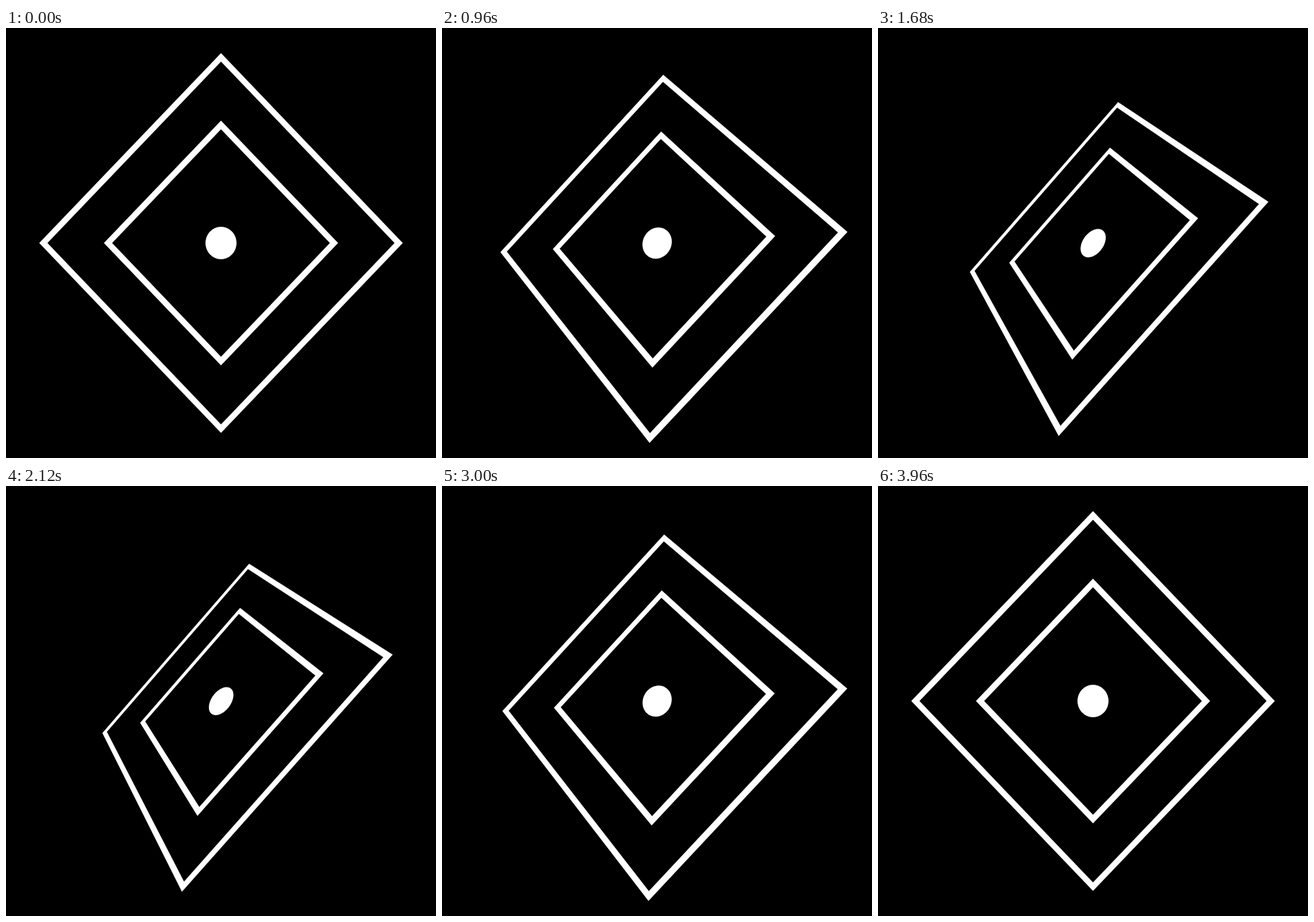
An HTML page with a canvas for the animation above (4 s loop, 621x621 px).

```html
<!DOCTYPE html>
<html lang="en">
<head>
<meta charset="utf-8">
<title>Tilting diamonds</title>
<style>
  html, body {
    margin: 0;
    width: 100%;
    height: 100%;
    overflow: hidden;
    background: #000;
  }
  canvas { display: block; width: 100vw; height: 100vh; }
</style>
</head>
<body>
<canvas id="stage" width="621" height="621"></canvas>
<script>
const SIZE = 621;
const CENTER = SIZE / 2;
const CAMERA = SIZE * 50 / 36;
const LOOP = 4000;
const STEP = 40;
const MAX_TILT = 52.75 * Math.PI / 180;
const AXIS = [0.641, -0.767, -0.023];
const SQUEEZE = 0.957;
const STROKE = 12.4; // measured along the diagonal

const ctx = document.getElementById('stage').getContext('2d');

const smooth = p => p * p * (3 - 2 * p);

// Rotate a point of the flat figure about AXIS, then apply perspective.
function projector(angle) {
  const [ax, ay, az] = AXIS;
  const c = Math.cos(angle), s = Math.sin(angle), k = 1 - c;
  return (px, y) => {
    const x = px * SQUEEZE;
    const rx = (c + ax * ax * k) * x + (ax * ay * k - az * s) * y;
    const ry = (ax * ay * k + az * s) * x + (c + ay * ay * k) * y;
    const rz = (ax * az * k - ay * s) * x + (ay * az * k + ax * s) * y;
    const zoom = CAMERA / (CAMERA - rz);
    return [CENTER + rx * zoom, CENTER + ry * zoom];
  };
}

function trace(points) {
  points.forEach(([x, y], i) => i ? ctx.lineTo(x, y) : ctx.moveTo(x, y));
  ctx.closePath();
}

function ring(project, sides, radius) {
  return Array.from({ length: sides }, (_, i) => {
    const a = i / sides * 2 * Math.PI;
    return project(radius * Math.cos(a), radius * Math.sin(a));
  });
}

function draw(time) {
  const t = Math.floor((time % LOOP) / STEP) * STEP;
  const half = LOOP / 2;
  const progress = 1 - Math.abs(t - half) / half;
  const project = projector(MAX_TILT * smooth(progress));

  ctx.fillStyle = '#000';
  ctx.fillRect(0, 0, SIZE, SIZE);
  ctx.fillStyle = '#fff';
  ctx.beginPath();
  for (const radius of [274.3, 176.7]) {
    trace(ring(project, 4, radius));
    trace(ring(project, 4, radius - STROKE));
  }
  trace(ring(project, 96, 23.4));
  ctx.fill('evenodd');
}

const start = performance.now();
function tick() {
  draw(performance.now() - start);
  requestAnimationFrame(tick);
}
tick();
</script>
</body>
</html>
```
